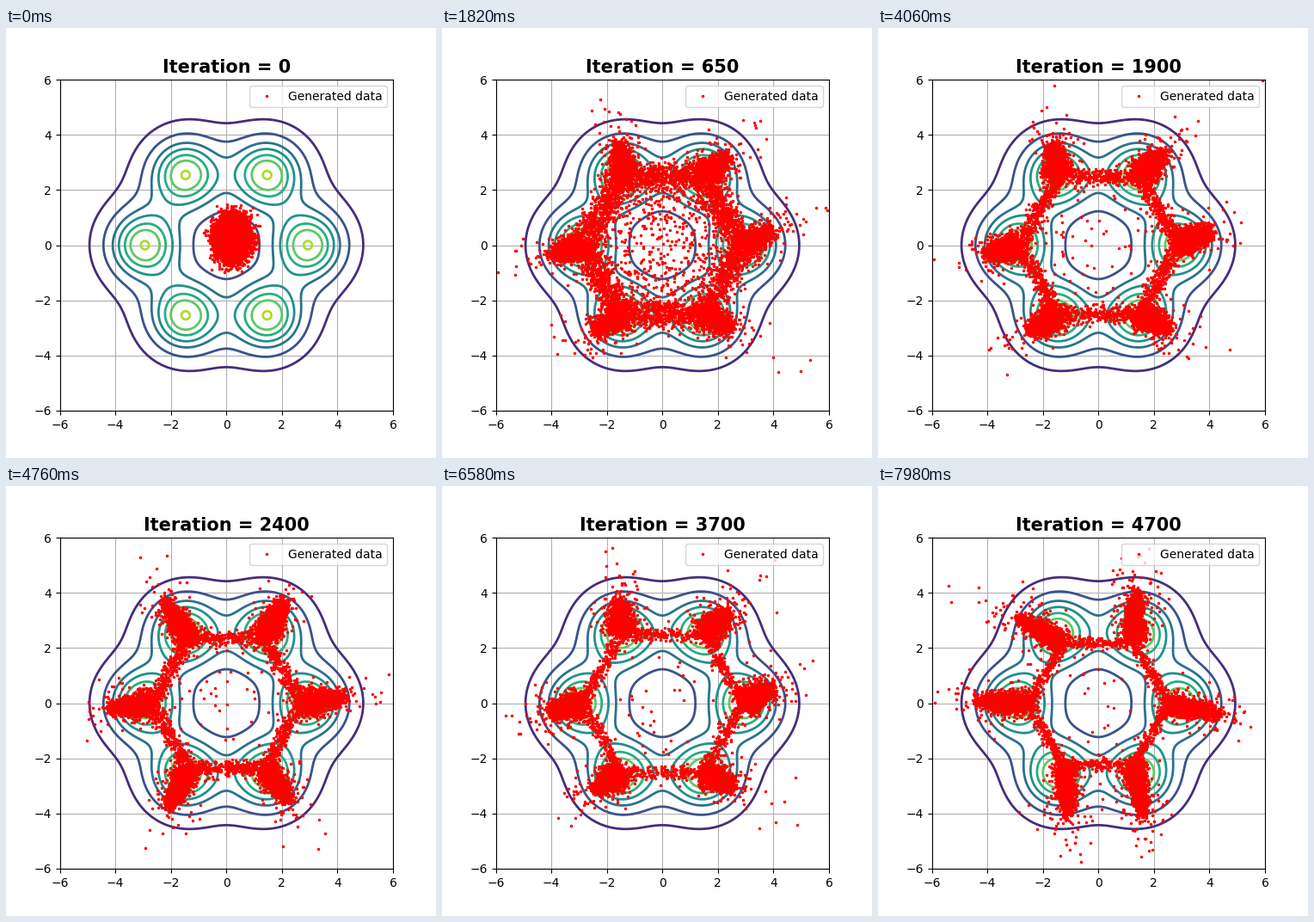
These frames come from a looping animation (500x500 px, 8000 ms). A matplotlib script:

```python
import numpy as np
import matplotlib.pyplot as plt
from matplotlib.animation import FuncAnimation

FRAMES, INTERVAL, STEP_MS = 200, 40, 140
LAST = (FRAMES * INTERVAL - 1) // STEP_MS
N = 10000
PERIOD = 17  # steps between two swings of the streaks

angles = np.arange(6) * np.pi / 3
lean = np.radians([22, -25, -30, 10, -35, 30])


def polar(r, a):
    return np.column_stack([r * np.cos(a), r * np.sin(a)])


def normal_to(v):
    unit = v / np.linalg.norm(v, axis=1, keepdims=True)
    return np.column_stack([-unit[:, 1], unit[:, 0]])


def streaks(step):
    """Root, direction and length of the streak at each mode."""
    pulse = np.cos(2 * np.pi * (step - 13) / PERIOD)
    root = polar(2.7 + .2 * pulse, angles)
    heading = polar(1, angles + lean * pulse + .1)
    return root, heading, 1.35 - .3 * pulse


def cloud(step):
    rng = np.random.default_rng(step + 7)

    def fade(span):
        return np.exp(-step / span)

    late = step / LAST
    m = rng.integers(6, size=N)
    gauss = rng.normal(size=(N, 2))
    root, heading, length = streaks(step)

    # Streaks that taper towards their tips
    t = 1.25 * rng.beta(1.3, 1.9, (N, 1))
    width = (.34 - .1 * length) * (1.1 - .5 * t)
    core = (root[m] + heading[m] * length * t
            + normal_to(heading)[m] * gauss[:, :1] * width
            + .06 * rng.normal(size=(N, 2)))

    # Links between neighbouring modes
    gap = np.roll(root, -1, axis=0) - root
    link = (root[m] + gap[m] * rng.beta(.8, .8, (N, 1))
            + normal_to(gap)[m] * gauss[:, :1] * (.1 + .35 * fade(16)))

    disc = polar(2.2 * np.sqrt(rng.random(N)), rng.uniform(0, 2 * np.pi, N))

    spread = .3 + fade(5) + .2 * late
    stray = (root[m] + spread * gauss
             + heading[m] * (.5 * length + rng.exponential(1.3 * spread, (N, 1))))

    shares = [.12 + .8 * fade(15), .002 + .25 * fade(7), .03 + .3 * fade(4.5) + .035 * late]
    pick = rng.random((N, 1))
    xy = np.select([pick < s for s in np.cumsum(shares)], [link, disc, stray], core)

    grow = np.clip(step / 6, 0, 1)
    grow = grow * grow * (3 - 2 * grow)
    start = [.2, .25] + rng.normal(size=(N, 2)) * [.27, .36]
    return (1 - grow) * start + grow * xy


def iteration(step):
    return 50 * step + 50 * max(step - 20, 0)


fig, ax = plt.subplots(figsize=(5, 5), dpi=100)

# Six heavy-tailed modes on a ring
gx, gy = np.meshgrid(np.linspace(-6, 6, 241), np.linspace(-6, 6, 241))
density = sum((1 + ((gx - x) ** 2 + (gy - y) ** 2) / 5) ** -3.5
              for x, y in polar(2.97, angles))
levels = [.146, .306, .478, .618, .765, .893, 1.046]
ax.contour(gx, gy, density, levels=levels, linewidths=2,
           colors=plt.cm.viridis(np.arange(1, 8) / 8))

dots, = ax.plot([], [], "r.", markersize=3, label="Generated data")
ax.set(xlim=(-6, 6), ylim=(-6, 6), xticks=range(-6, 7, 2), yticks=range(-6, 7, 2))
ax.grid(True)
ax.legend(loc="upper right")
title = ax.set_title("", fontsize=15, fontweight="bold")

clouds = [cloud(s) for s in range(LAST + 1)]


def update(frame):
    step = (frame * INTERVAL + INTERVAL // 2) // STEP_MS
    dots.set_data(*clouds[step].T)
    title.set_text(f"Iteration = {iteration(step)}")
    return dots, title


anim = FuncAnimation(fig, update, frames=FRAMES, interval=INTERVAL,
                     repeat=True, repeat_delay=0, blit=False)
plt.show()
```
